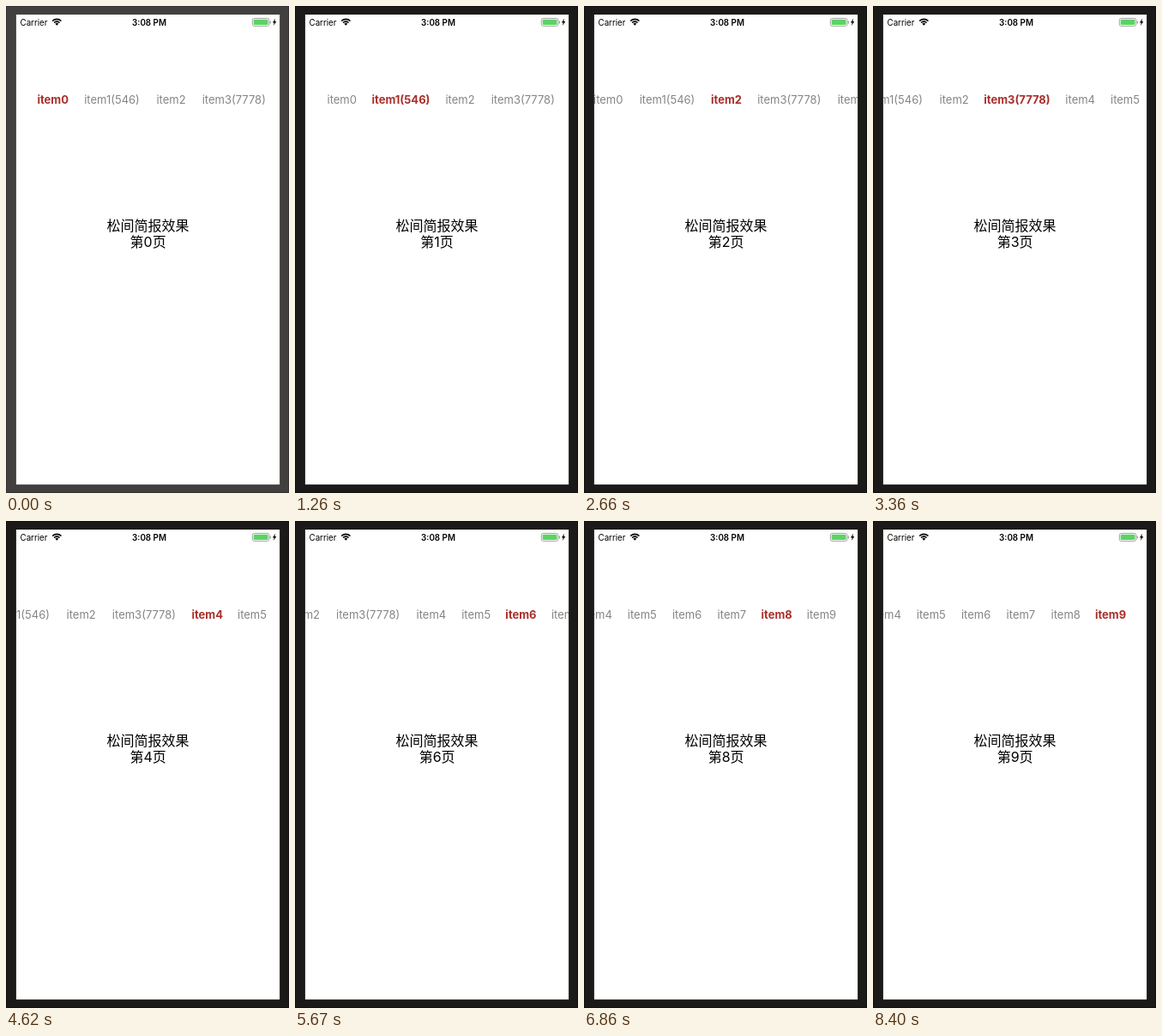
Write an HTML page with a canvas that moves like this. It is 330 px wide and 568 px high and loops after 9.24 s.

```html
<!DOCTYPE html>
<html lang="zh-CN">
<head>
<meta charset="utf-8">
<title>Tab bar</title>
<style>
  html, body { margin: 0; width: 100%; height: 100%; overflow: hidden; background: #fff; }
  canvas { display: block; width: 330px; height: 568px; }
</style>
</head>
<body>
<canvas id="stage"></canvas>
<script>
const W = 330, H = 568, LOOP = 9240, TICK = 70;
const SCREEN = { x: 11.9, y: 10, w: 307.2, h: 548.1 };
const TAB_MID = 166;
const MAX_SCROLL = 324;
const FONT = 'Inter, "Noto Sans CJK SC", "Noto Sans CJK", sans-serif';

const canvas = document.getElementById('stage');
const ctx = canvas.getContext('2d');
const dpr = window.devicePixelRatio || 1;
canvas.width = W * dpr;
canvas.height = H * dpr;

// Tab centres at zero scroll; tabs after the fourth are evenly spaced.
const counts = { 1: '(546)', 3: '(7778)' };
const firstCentres = [54.7, 123.5, 192.5, 265.8];
const tabs = Array.from({ length: 10 }, (_, i) => ({
  label: 'item' + i + (counts[i] || ''),
  x: i < 4 ? firstCentres[i] : 339.5 + (i - 4) * 52.3
}));

// Each tap: time and chosen page.
const taps = [[0, 0], [1120, 1], [2240, 2], [3150, 3], [4620, 4], [5670, 6], [6580, 8], [8050, 9]];

const clamp = (v, lo, hi) => Math.min(hi, Math.max(lo, v));
const mix = (a, b, p) => a + (b - a) * p;
const scrollFor = page => clamp(tabs[page].x - TAB_MID, 0, MAX_SCROLL);

// cubic-bezier(.42, 0, .58, 1)
function easeInOut(x) {
  if (x <= 0) return 0;
  if (x >= 1) return 1;
  let lo = 0, hi = 1;
  for (let i = 0; i < 24; i++) {
    const s = (lo + hi) / 2, r = 1 - s;
    if (3 * r * r * s * 0.42 + 3 * r * s * s * 0.58 + s ** 3 < x) lo = s; else hi = s;
  }
  return lo * lo * (3 - 2 * lo);
}

function stateAt(t) {
  let i = taps.length - 1;
  while (taps[i][0] > t) i--;
  const [start, page] = taps[i];
  const from = scrollFor(i ? taps[i - 1][1] : 0);
  return {
    page,
    scroll: mix(from, scrollFor(page), easeInOut((t - start + 55) / 300)),
    focus: clamp((t - 1050 + TICK) / (4 * TICK), 0, 1)
  };
}

function text(str, x, y, size, { color = '#000', weight = 400, align = 'center' } = {}) {
  ctx.font = `${weight} ${size}px ${FONT}`;
  ctx.textAlign = align;
  ctx.fillStyle = color;
  ctx.fillText(str, x, y);
}

const blend = (a, b, p) => `rgb(${a.map((v, i) => Math.round(mix(v, b[i], p)))})`;

function drawBezel(focus) {
  ctx.fillStyle = blend([66, 64, 63], [28, 26, 24], focus);
  ctx.fillRect(0, 0, W, H);
  ctx.strokeStyle = blend([52, 50, 49], [18, 17, 16], focus);
  ctx.lineWidth = 1;
  ctx.strokeRect(0.5, 0.5, W - 1, H - 1);
  ctx.fillStyle = '#fff';
  ctx.fillRect(SCREEN.x, SCREEN.y, SCREEN.w, SCREEN.h);
}

function drawWifi(x, y) {
  const a = -Math.PI * 0.75, b = -Math.PI * 0.25;
  ctx.fillStyle = ctx.strokeStyle = '#000';
  ctx.lineWidth = 1.6;
  for (const r of [4.6, 7.3]) {
    ctx.beginPath();
    ctx.arc(x, y, r, a, b);
    ctx.stroke();
  }
  ctx.beginPath();
  ctx.moveTo(x, y);
  ctx.arc(x, y, 2.7, a, b);
  ctx.fill();
}

function roundBox(x, y, w, h, r) {
  ctx.beginPath();
  ctx.roundRect(x, y, w, h, r);
}

function drawBattery() {
  ctx.strokeStyle = '#999';
  ctx.lineWidth = 0.9;
  roundBox(287.3, 14.4, 19.6, 9, 2.2);
  ctx.stroke();
  ctx.fillStyle = '#5bd364';
  roundBox(288.7, 15.8, 16.8, 6.2, 1);
  ctx.fill();
  ctx.fillStyle = '#999';
  roundBox(307.7, 17.3, 1.2, 3.2, 0.6);
  ctx.fill();

  ctx.fillStyle = '#000';
  ctx.beginPath();
  ctx.moveTo(314.1, 14.6);
  ctx.lineTo(310.9, 19.4);
  ctx.lineTo(312.8, 19.4);
  ctx.lineTo(311.9, 23);
  ctx.lineTo(315.3, 18);
  ctx.lineTo(313.4, 18);
  ctx.closePath();
  ctx.fill();
}

function drawStatus() {
  text('Carrier', 16.6, 22.5, 9.7, { align: 'left' });
  drawWifi(59.3, 22.7);
  text('3:08 PM', 167, 22.5, 9.8, { weight: 600 });
  drawBattery();
}

function drawTabs(page, scroll) {
  tabs.forEach((tab, i) => {
    const style = i === page
      ? { color: '#a92e2a', weight: 700 }
      : { color: '#858585' };
    text(tab.label, tab.x - scroll, 113.5, 13, style);
  });
}

function draw(t) {
  const { page, scroll, focus } = stateAt(t);
  ctx.setTransform(dpr, 0, 0, dpr, 0, 0);
  drawBezel(focus);
  ctx.save();
  ctx.beginPath();
  ctx.rect(SCREEN.x, SCREEN.y, SCREEN.w, SCREEN.h);
  ctx.clip();
  drawStatus();
  drawTabs(page, scroll);
  text('松间简报效果', 165.6, 262.2, 16);
  text(`第${page}页`, 165.6, 281, 16);
  ctx.restore();
}

const began = performance.now();
function frame() {
  const t = (performance.now() - began) % LOOP;
  draw(Math.floor(t / TICK) * TICK);
  requestAnimationFrame(frame);
}
frame();
</script>
</body>
</html>
```
